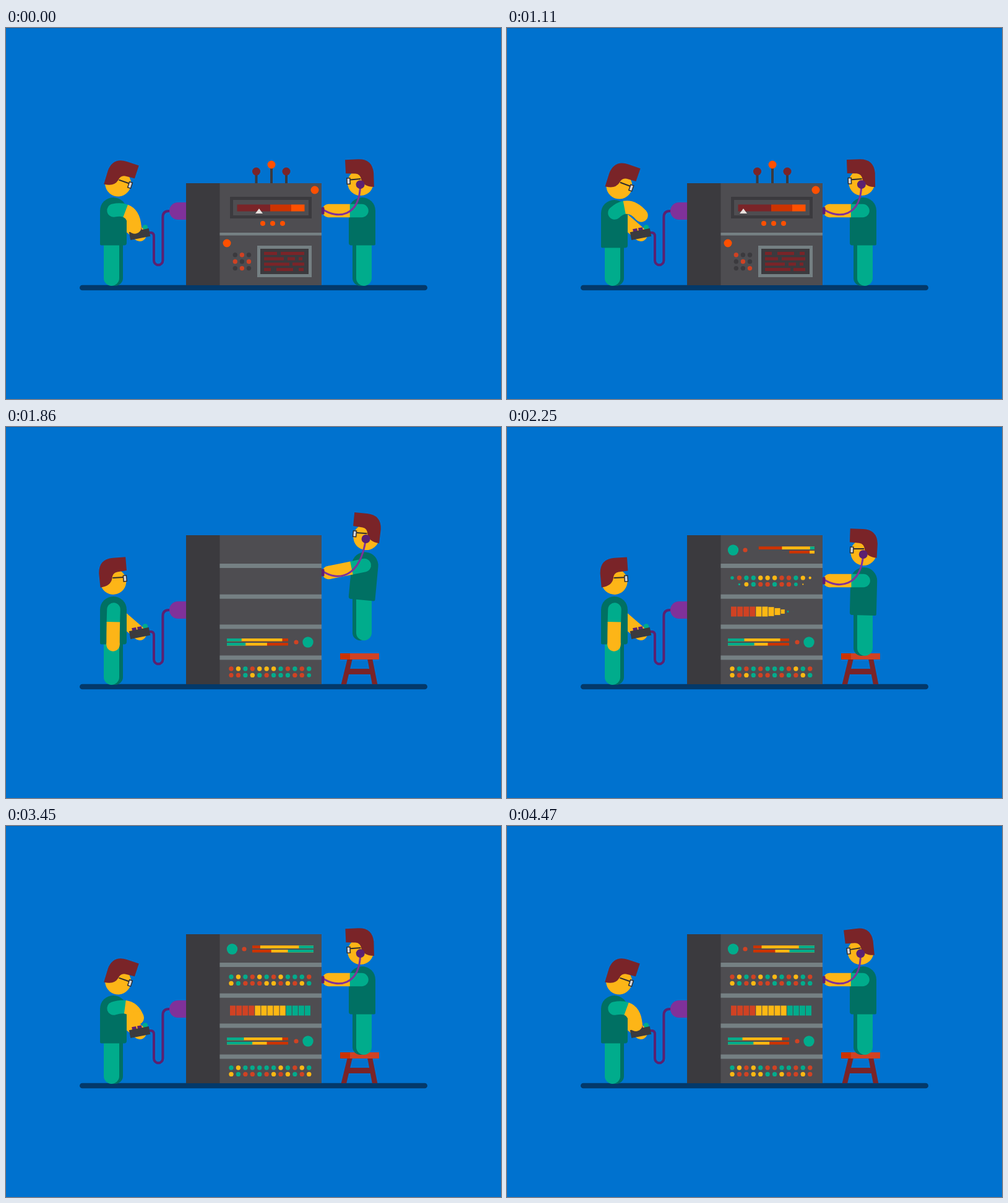
These frames come from a looping animation (800 px wide and 600 px high, 4500 ms). An HTML page with a canvas:

```html
<!DOCTYPE html>
<html lang="en">
<head>
<meta charset="utf-8">
<title>Machine upgrade</title>
<style>
html, body { margin: 0; width: 100%; height: 100%; overflow: hidden; background: #0072cf; }
canvas { display: block; width: 800px; height: 600px; }
</style>
</head>
<body>
<canvas id="stage"></canvas>
<script>
const LOOP = 4500;
const canvas = document.getElementById('stage');
const ctx = canvas.getContext('2d');
const ratio = window.devicePixelRatio || 1;
canvas.width = 800 * ratio;
canvas.height = 600 * ratio;

const C = {
  bg: '#0072cf', floor: '#03396a', skin: '#fdb517', hair: '#7a2428', teal: '#00ac8c', green: '#007063',
  plum: '#5c2070', purple: '#80319a', dark: '#3b3a3e', front: '#4e4d51', grey: '#758083',
  red: '#d04223', rust: '#cc3300', orange: '#ff5000', yellow: '#fdb813', pale: '#e8e0dd'
};
const LIGHTS = [C.red, C.yellow, C.teal];

// ---------- motion tables: [time, value] ----------
const pointerX = [[0, 409], [200, 450], [420, 395], [650, 465], [880, 402], [1110, 382], [1250, 410]];
const machineRise = [[1440, 0], [1560, .62], [1650, 1.06], [1740, .985], [1820, 1]];
const stoolDrop = [[1500, 51], [1560, 27], [1625, -4], [1700, 0]];
const crouch = [[1000, 0], [1110, 4], [1230, 0]];
const nod = [[0, 18], [1000, 18], [1110, 19], [1230, 18], [1480, -8], [1560, -6], [2250, -4], [2640, -5],
  [2770, -12], [2940, 0], [3150, 18], [4500, 18]];
const hop = [[1500, 0], [1560, -23], [1620, -56], [1775, -93], [1950, -47], [2010, -45], [2090, -47]];
const lean = [[1560, 0], [1680, 6], [1800, 6], [1980, 3], [2250, 1.4], [2500, 0]];
const gaze = [[0, 3], [1110, 2], [1560, 2], [1760, -6], [2250, -2], [2700, 2], [3990, 3], [4320, 3.5], [4470, 7]];

// arm poses: hand x, hand y, bend x, bend y
const POSE = {
  a: [208, 322, 206, 289], b: [211, 309, 203, 284], c: [217, 321, 203, 298],
  up: [217, 303, 196, 279], hang: [173, 352, 173, 323]
};
const armSteps = [
  [0, 'a'], [150, 'b'], [300, 'c'], [450, 'b'], [600, 'a'], [750, 'b'], [900, 'c'], [1000, 'b'], [1110, 'up'],
  [1220, 'c'], [1300, 'c'], [1500, 'hang'], [2700, 'hang'], [2910, 'c'], [2970, 'c'], [3120, 'b'], [3270, 'a'],
  [3420, 'b'], [3570, 'c'], [3720, 'b'], [3840, 'a'], [3990, 'b'], [4140, 'c'], [4300, 'b'], [4500, 'a']
];
const armTracks = [0, 1, 2, 3].map(i => armSteps.map(([t, name]) => [t, POSE[name][i]]));

// ---------- helpers ----------
const clamp = v => Math.min(1, Math.max(0, v));
const mix = (a, b, p) => a + (b - a) * p;
const ease = (t, start, length) => {
  const u = clamp((t - start) / length);
  return u * u * (3 - 2 * u);
};
const noise = n => {
  const s = Math.sin(n * 127.1 + 31.7) * 43758.5453;
  return s - Math.floor(s);
};

// Smooth curve through the steps that never overshoots them.
function track(keys, t) {
  const last = keys.length - 1;
  if (t <= keys[0][0]) return keys[0][1];
  if (t >= keys[last][0]) return keys[last][1];
  let i = 0;
  while (t >= keys[i + 1][0]) i++;
  const slope = n => (keys[n + 1][1] - keys[n][1]) / (keys[n + 1][0] - keys[n][0]);
  const tangent = n => {
    if (n === 0 || n === last) return 0;
    const a = slope(n - 1), b = slope(n);
    return a * b > 0 ? 2 * a * b / (a + b) : 0;
  };
  const h = keys[i + 1][0] - keys[i][0], u = (t - keys[i][0]) / h, v = 1 - u;
  return v * v * ((1 + 2 * u) * keys[i][1] + u * h * tangent(i)) +
    u * u * ((3 - 2 * u) * keys[i + 1][1] - v * h * tangent(i + 1));
}

function rect(x, y, w, h, color, radius = 0) {
  if (w <= 0 || h <= 0) return;
  ctx.fillStyle = color;
  ctx.beginPath();
  if (radius) ctx.roundRect(x, y, w, h, radius);
  else ctx.rect(x, y, w, h);
  ctx.fill();
}

function dot(x, y, r, color) {
  if (r <= 0) return;
  ctx.fillStyle = color;
  ctx.beginPath();
  ctx.arc(x, y, r, 0, Math.PI * 2);
  ctx.fill();
}

function shape(path, color) {
  ctx.fillStyle = color;
  ctx.fill(new Path2D(path));
}

function line(path, color, width, cap = 'round') {
  ctx.strokeStyle = color;
  ctx.lineWidth = width;
  ctx.lineCap = cap;
  ctx.stroke(new Path2D(path));
}

function group(x, y, draw, turn = 0, sx = 1, sy = 1) {
  ctx.save();
  ctx.translate(x, y);
  ctx.scale(sx, sy);
  ctx.rotate(turn * Math.PI / 180);
  draw();
  ctx.restore();
}

// Draws around a centre, scaled; nothing at zero.
function scaled(x, y, s, draw) {
  if (s > .002) group(x, y, draw, 0, s, s);
}

// ---------- people ----------
function arm(x0, y0, cx, cy, x1, y1) {
  const u = .36;
  const ax = mix(x0, cx, u), ay = mix(y0, cy, u), bx = mix(cx, x1, u), by = mix(cy, y1, u);
  line(`M${x0} ${y0}Q${ax} ${ay} ${mix(ax, bx, u)} ${mix(ay, by, u)}`, C.teal, 21.5);
  line(`M${mix(ax, bx, u)} ${mix(ay, by, u)}Q${bx} ${by} ${x1} ${y1}`, C.skin, 21.5, 'butt');
  dot(x1, y1, 10.75, C.skin);
}

function head() {
  dot(1.5, -20, 21, C.skin);
  shape('M24.5-58V-36L9-35Q1-34 0-25Q-3-13-20-12L-20.5-35Q-19-58 4-58Z', C.hair);
  line('M1-26L18-25.5', '#2d2c30', 2, 'butt');
  rect(17.5, -29, 6.5, 11, '#2d2c30');
  rect(19, -27.5, 3.6, 8, '#d5d6da');
}

function person(x, y, face, drop, tilt, turn) {
  group(x, y, () => {
    rect(-9.5, 335, 25, 82, C.green, 12.5);
    rect(-15.5, 335, 25, 82, C.teal, 12.5);
    group(0, 345 + drop, () => rect(-21.5, -71, 43, 77.5, C.green, [21.5, 21.5, 4, 2]), -tilt);
    group(-tilt * 1.2, 270 + drop, head, turn);
  }, 0, face, 1);
}

function operator(t) {
  const drop = track(crouch, t);
  line('M186 308L216 334', C.skin, 22);
  person(173.5, 0, 1, drop, 0, track(nod, t));
  line('M230 331H234Q239 331 239 337V376A7.2 7.2 0 0 0 253.4 376V306Q253.4 296 263 296H268', C.plum, 4);
  rect(264, 282, 27, 28, C.purple, [14, 0, 0, 14]);
  dot(225, 322.5, 4.2, C.teal);
  group(216, 333.5, () => {
    rect(-11, -10.5, 7, 5, C.plum);
    rect(-2, -10.5, 7, 5, C.plum);
    rect(-16.3, -6.5, 32.6, 13, C.dark);
  }, -11);
  const [hx, hy, cx, cy] = armTracks.map(keys => track(keys, t));
  arm(174, 295 + drop, cx, cy, hx, hy);
}

function stool(t) {
  if (t < 1500) return;
  ctx.save();
  ctx.beginPath();
  ctx.rect(500, 0, 140, 416);
  ctx.clip();
  ctx.translate(0, track(stoolDrop, t));
  shape('M552 374H560L550 417H541.5ZM584 374H592L600.5 417H592ZM550 391H593V400H550Z', C.hair);
  rect(540, 366, 63, 10, C.red);
  rect(540, 366, 16, 10, C.rust);
  ctx.restore();
}

function technician(t) {
  const y = track(hop, t), tilt = track(lean, t), turn = track(gaze, t);
  stool(t);
  person(575.5, y, -1, 0, tilt, turn);
  const handY = 295.5 + Math.max(y, -60), shoulderX = 575 + tilt * .8;
  arm(shoulderX, 295.5 + y, (shoulderX + 521.5) / 2, (295.5 + y + handY) / 2, 521.5, handY);
  const a = turn * Math.PI / 180;
  const earX = 575.5 + tilt * 1.2 - 2 * Math.cos(a) - 17 * Math.sin(a);
  const earY = 270 + y - 17 * Math.cos(a) + 2 * Math.sin(a);
  line(`M513 ${handY - 1.5}C535 ${handY + 13} 572 ${handY + 11} ${earX} ${earY}`, C.purple, 3);
  dot(earX, earY, 7, C.plum);
  rect(510, handY - 6, 4.5, 12, C.plum, 1.5);
}

// ---------- first machine ----------
const textRows = [
  [[417, 21], [444, 38]],
  [[417, 32], [455, 12], [473, 6]],
  [[417, 41], [463, 19]],
  [[417, 11], [437, 27], [473, 8]]
];

function antennas(t) {
  const sink = 45 * ease(t, 1260, 150);
  if (sink >= 45) return;
  [[404.5, 232, C.hair], [429, 221, C.orange], [453, 232, C.hair]].forEach(([x, y, color]) => {
    rect(x - 2, y + sink, 4, 252 - y, C.dark);
    dot(x, y + sink, 6.5, color);
  });
}

function gauge(t) {
  rect(-66, -17.5, 132, 35, C.dark);
  rect(-61, -12.5, 122, 25, C.front);
  rect(-54.5, -5, 53.5, 11, C.hair);
  rect(-1, -5, 34, 11, C.rust);
  rect(33, -5, 21.5, 11, C.orange);
  const x = track(pointerX, t) - 428;
  shape(`M${x} 1.5L${x + 6} 9.5H${x - 6}Z`, C.pale);
}

function screen(t) {
  rect(-44, -25.5, 88, 51, C.grey);
  rect(-39, -20.5, 78, 41, C.dark);
  const first = Math.floor(t / 365);
  for (let i = 0; i < 4; i++) {
    for (const [x, w] of textRows[(first + i) % 4]) rect(x - 450, -15.5 + i * 8.7, w, 5, C.hair);
  }
}

function oldPanel(t) {
  const gone = delay => 1 - ease(t, 1250 + delay, 140);
  dot(499, 262, 6.5 * gone(0), C.orange);
  dot(357, 348, 6.5 * gone(20), C.orange);
  scaled(428, 290.5, gone(40), () => gauge(t));
  scaled(450, 377.5, gone(50), () => screen(t));
  for (let i = 0; i < 3; i++) dot(415 + 16 * i, 316, 4 * gone(15 * i), C.orange);
  const beat = Math.floor(t / 185);
  for (let i = 0; i < 9; i++) {
    const lit = noise(beat * 9 + i + 4) > .42;
    dot(370.3 + 11.1 * (i % 3), 367 + 10.8 * Math.floor(i / 3), 3.7 * gone(10 * i), lit ? C.red : C.dark);
  }
}

// ---------- second machine ----------
function lights(t, y, start) {
  for (let i = 0; i < 24; i++) {
    const x = 364 + 11.43 * (i % 12), row = i < 12 ? 0 : 1;
    const size = ease(t, start + 4 * Math.abs(x - 425) + 70 * row, 130);
    const beat = Math.floor((t + 300 * noise(i + y)) / 300);
    dot(x, y + 10.4 * row, 3.7 * size, LIGHTS[Math.floor(noise(beat * 24 + i + y) * 3)]);
  }
}

// A three-part bar whose edges run out one after another from the fixed end.
function bar(t, from, to, y, cuts, start) {
  const dir = Math.sign(to - from);
  const ends = [to, ...cuts].map((x, i) => mix(from, x, ease(t, start + 55 * i, 240)));
  [C.rust, C.yellow, C.teal].forEach((color, i) => {
    const w = Math.abs(ends[i] - from);
    rect(dir > 0 ? from : from - w, y, w, 4.6, color);
  });
}

function newPanel(t) {
  const wave = (speed, size) => size * Math.sin(t / speed);
  dot(365.5, 199, 8.7 * ease(t, 1990, 150), C.teal);
  dot(385, 199, 3.6 * ease(t, 2030, 150), C.red);
  bar(t, 497, 398, 193.3, [411 + wave(110, 2.5), 472.5 + wave(90, 1.5)], 2055);
  bar(t, 497, 398, 200, [431 + wave(140, 5), 455.5 + wave(100, 1.5)], 2145);

  lights(t, 244, 1920);

  for (let i = 0; i < 13; i++) {
    const s = ease(t, 1885 + 35 * i, 190), w = 9 * Math.min(1, s * 1.6);
    rect(362 + 10.08 * i, 298.5 - 8 * s, w, 16 * s, i < 4 ? C.red : i < 9 ? C.yellow : C.teal);
  }

  dot(488, 348, 8.7 * ease(t, 1535, 150), C.teal);
  dot(469, 348, 3.6 * ease(t, 1575, 150), C.red);
  bar(t, 357, 456, 342, [444 + wave(130, 2.5), 382.5 + wave(105, 2)], 1510);
  bar(t, 357, 456, 349, [424 + wave(95, 2.5), 400 + wave(120, 4)], 1600);

  lights(t, 391, 1430);
}

function machine(t) {
  const p = track(machineRise, t), top = mix(251, 175, p);
  antennas(t);
  rect(291, top, 55, 416 - top, C.dark);
  rect(345.5, top, 164.5, 416 - top, C.front);
  rect(345.5, mix(331, 221, p), 164.5, mix(4.6, 7, p), C.grey);
  [[369.5, 1465], [319.5, 1552], [270.7, 1640]].forEach(([y, start]) => {
    const w = 164.5 * ease(t, start, 160);
    rect(427.75 - w / 2, y, w, 7, C.grey);
  });
  if (t < 1420) oldPanel(t);
  else newPanel(t);
}

// ---------- scene ----------
function render(t) {
  ctx.setTransform(ratio, 0, 0, ratio, 0, 0);
  rect(0, 0, 800, 600, C.bg);
  rect(0, 0, 800, 1, '#0067bd');
  rect(119, 415.7, 562, 8.6, C.floor, 4.3);
  machine(t);
  operator(t);
  technician(t);
}

const begin = performance.now();
function tick() {
  render((performance.now() - begin) % LOOP);
  requestAnimationFrame(tick);
}
tick();
</script>
</body>
</html>
```
